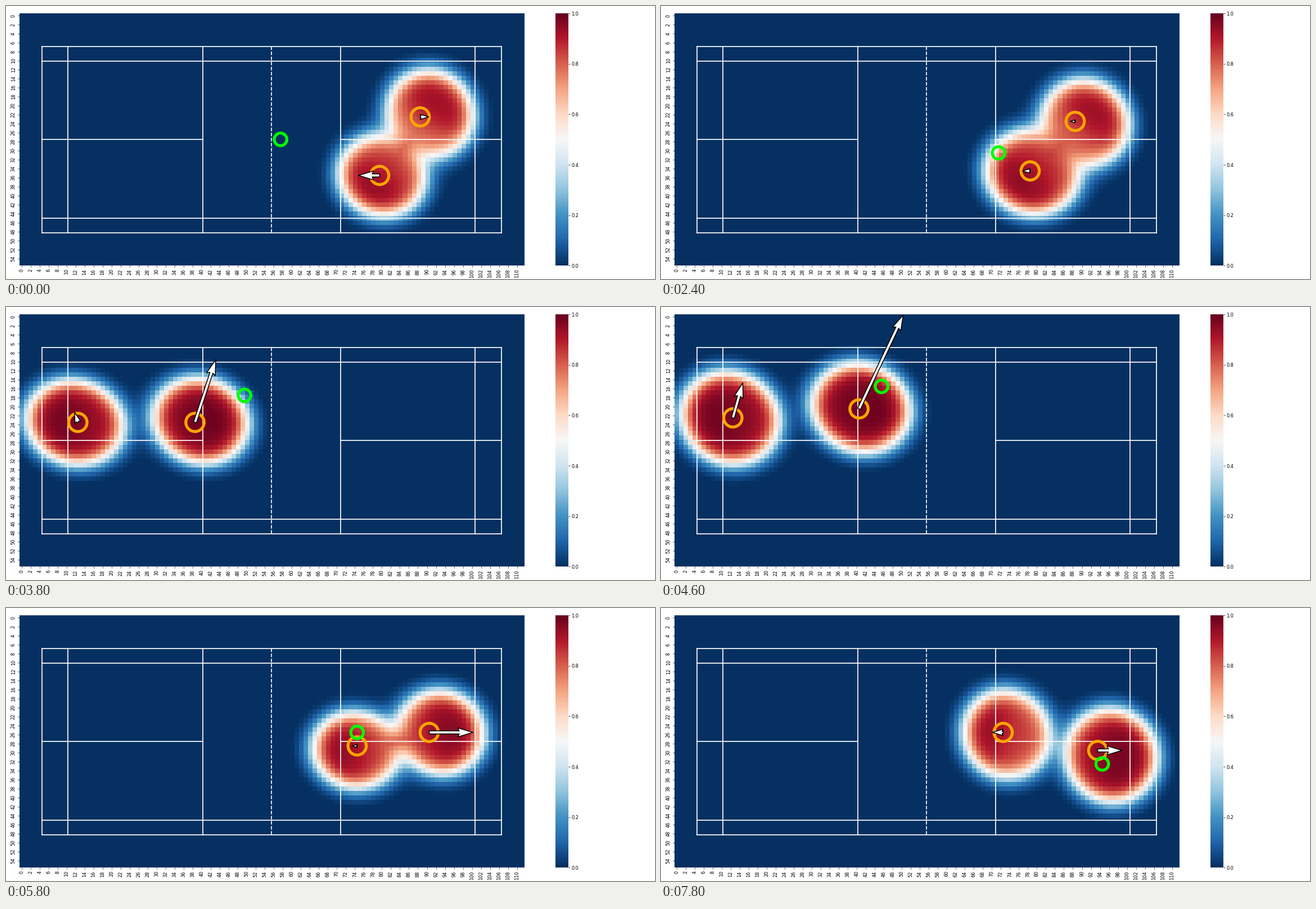
Write a matplotlib script that moves like this. It is 1154 px wide and 485 px high and loops after 8000 ms.

```python
import numpy as np
import matplotlib.pyplot as plt
from matplotlib.animation import FuncAnimation
from matplotlib.patches import Circle

W, H, DPI = 1154, 485, 100
PT = 72 / DPI                      # points per pixel
COLS, ROWS = 112, 56
LEFT, TOP, RIGHT, BOTTOM = 23.7, 13, 920.7, 461
FRAMES, STEP = 40, 200
NET = 56
EDGE = 1.3                         # softness of the control area border

plt.rcParams["font.family"] = "DejaVu Sans"

# Per player: x, y, arrow u, v, area offset x, y, area radii x, y, level
RIGHT_TIMES = np.array([0, 12, 29, 33, 39])
RIGHT_TEAM = [
    np.array([
        [89, 23, 1.9, 0, 2.0, -0.5, 9.4, 9.5, .86],
        [89, 24, -1.1, 0, 2.0, 0.5, 9.5, 9.4, .87],
        [91, 26, 9.7, 0, 2.3, 0.1, 9.4, 9.0, .92],
        [92, 28, 3.9, 0, 3.4, 0.5, 9.1, 9.5, .88],
        [94, 30, 5.4, 0, 2.8, 1.2, 10.1, 10.1, .95],
    ]),
    np.array([
        [80, 36, -4.7, 0, 0.5, 0.0, 9.4, 8.8, .91],
        [79, 35, -1.7, 0, 0.5, 0.3, 10.2, 9.2, .92],
        [75, 29, -1.1, 0, -0.3, 1.0, 9.4, 8.2, .91],
        [74, 27, -6.0, 0, 0.5, -0.1, 9.2, 10.0, .95],
        [73, 26, -2.4, 0, 0.8, 0.5, 9.5, 9.5, .90],
    ]),
]
LEFT_TIMES = np.array([19, 23])
LEFT_TEAM = [
    np.array([
        [13, 24, -0.7, -2.2, -0.6, 0.1, 10.6, 9.1, .965],
        [13, 23, 2.2, -7.8, -0.6, 0.1, 10.7, 10.0, .97],
    ]),
    np.array([
        [39, 24, 4.6, -13.9, 1.1, -0.3, 10.3, 9.2, .98],
        [41, 21, 9.8, -20.8, 0.3, -0.1, 10.7, 9.6, .985],
    ]),
]

gx, gy = np.meshgrid(np.arange(COLS) + .5, np.arange(ROWS) + .5)


def at_time(times, keys, f):
    """Linear blend between keys, carried on past both ends."""
    i = np.clip(np.searchsorted(times, f, "right") - 1, 0, len(times) - 2)
    a = (f - times[i]) / (times[i + 1] - times[i])
    return keys[i] + (keys[i + 1] - keys[i]) * a


def ball_at(f):
    if f < 13:
        return 58 + 14 * f / 12, 28 + 3 * f / 12
    if f < 23:
        e = 1 - np.exp(-.257 * (f - 13))
        return 73 - 29 * e, 31 - 16.2 * e
    e = 1 - np.exp(-.11 * (f - 23))
    return 46.1 + 59 * e, 16 + 20 * e


def control_area(players, tilt):
    a, b = players
    gap = b[:2] - a[:2]
    dist = np.hypot(*gap)
    outward = gap / dist
    odds, cap, weight = 0, 0, 0
    for p, side in ((a, -1), (b, 1)):
        x, y, _, _, ox, oy, rx, ry, level = p
        dx, dy = (gx - x - ox) / rx, (gy - y - oy) / ry
        q = np.sqrt(dx**2 + dy**2 + 2 * tilt * dx * dy)
        odds = odds + np.exp((1 - q) * (rx + ry) / 2 / EDGE)
        ahead = side * ((gx - x) * outward[0] + (gy - y) * outward[1])
        w = np.exp(-3 * q)
        level = min(level, .985)
        cap = cap + w * (level + .6 * (1 - level) * np.tanh(ahead / 4))
        weight = weight + w
    # band joining two players who stand close together
    c0 = a[:2] + a[4:6]
    c1 = b[:2] + b[4:6]
    d = c1 - c0
    t = np.clip(((gx - c0[0]) * d[0] + (gy - c0[1]) * d[1]) / (d @ d), 0, 1)
    away = np.hypot(gx - c0[0] - t * d[0], gy - c0[1] - t * d[1])
    odds = odds + np.exp((4.5 - 1.2 * (dist - 15) - away) / EDGE)
    p = odds / (1 + odds)
    return np.clip((p - .02) / .98, 0, 1) * cap / weight


def pixel_axes(x0, y0, x1, y1):
    ax = fig.add_axes([x0 / W, 1 - y1 / H, (x1 - x0) / W, (y1 - y0) / H])
    for s in ax.spines.values():
        s.set_visible(False)
    ax.tick_params(labelsize=8.3 * PT, length=3 * PT, width=.7 * PT, pad=3 * PT)
    return ax


# the small surplus keeps the pixel size from rounding down
fig = plt.figure(figsize=((W + .01) / DPI, (H + .01) / DPI), dpi=DPI,
                 facecolor="white")
ax = pixel_axes(LEFT, TOP, RIGHT, BOTTOM)
heat = ax.imshow(np.zeros((ROWS, COLS)), cmap="RdBu_r", vmin=0, vmax=1,
                 extent=(0, COLS, ROWS, 0), aspect="auto",
                 interpolation="nearest", zorder=0)
ax.set_xticks(np.arange(.5, COLS, 2), range(0, COLS, 2), rotation=90)
ax.set_yticks(np.arange(.5, ROWS, 2), range(0, ROWS, 2), rotation=90, va="center")
ax.set_xlim(0, COLS)
ax.set_ylim(ROWS, 0)

bar = pixel_axes(977, 13, 999.5, 461.5)
bar.imshow(np.linspace(0, 1, 256)[:, None], cmap="RdBu_r", vmin=0, vmax=1,
           extent=(0, 1, 0, 1), origin="lower", aspect="auto")
bar.set_xticks([])
bar.yaxis.tick_right()
levels = np.linspace(0, 1, 6)
bar.set_yticks(levels, [f"{v:.1f}" for v in levels])


def court_line(x0, y0, x1, y1, style="-"):
    """Court marking given in stage pixels."""
    sx, sy = (RIGHT - LEFT) / COLS, (BOTTOM - TOP) / ROWS
    ax.plot([(x0 - LEFT) / sx, (x1 - LEFT) / sx],
            [(y0 - TOP) / sy, (y1 - TOP) / sy],
            style, color="white", lw=1.7 * PT, zorder=2)


X0, X1, Y0, Y1, MID = 63.5, 881, 72, 403.5, 237.5
for y in (Y0, 98, 377.5, Y1):
    court_line(X0, y, X1, y)
for x in (X0, 110.3, 349.5, 595, 834.3, X1):
    court_line(x, Y0, x, Y1)
court_line(X0, MID, 349.5, MID)
court_line(595, MID, X1, MID)
court_line(472.3, Y0, 472.3, Y1, "--")


def ring(radius, color, z):
    c = Circle((0, 0), radius, fill=False, ec=color, lw=5.2 * PT, zorder=z)
    return ax.add_patch(c)


rings = [ring(2.03, "orange", 3) for _ in range(2)]
ball = ring(1.4, "lime", 4)
arrows = ax.quiver([0, 0], [0, 0], [1, 1], [0, 0], angles="xy",
                   scale_units="xy", scale=1, units="dots", width=5.4,
                   color="white", edgecolor="black", linewidth=1.5 * PT,
                   zorder=5)


def draw(f):
    bx, by = ball_at(f)
    if bx < NET:
        times, team, tilt = LEFT_TIMES, LEFT_TEAM, -.08
    else:
        times, team, tilt = RIGHT_TIMES, RIGHT_TEAM, -.04
    players = [at_time(times, keys, f) for keys in team]
    heat.set_data(control_area(players, tilt))
    spots = np.array([np.round(p[:2]) for p in players])
    for r, spot in zip(rings, spots):
        r.set_center(spot)
    ball.set_center((round(bx), round(by)))
    arrows.set_offsets(spots)
    arrows.set_UVC([p[2] for p in players], [p[3] for p in players])
    return [heat, *rings, ball, arrows]


anim = FuncAnimation(fig, draw, frames=FRAMES, interval=STEP,
                     init_func=lambda: draw(0), repeat=True, repeat_delay=0)
plt.show()
```
